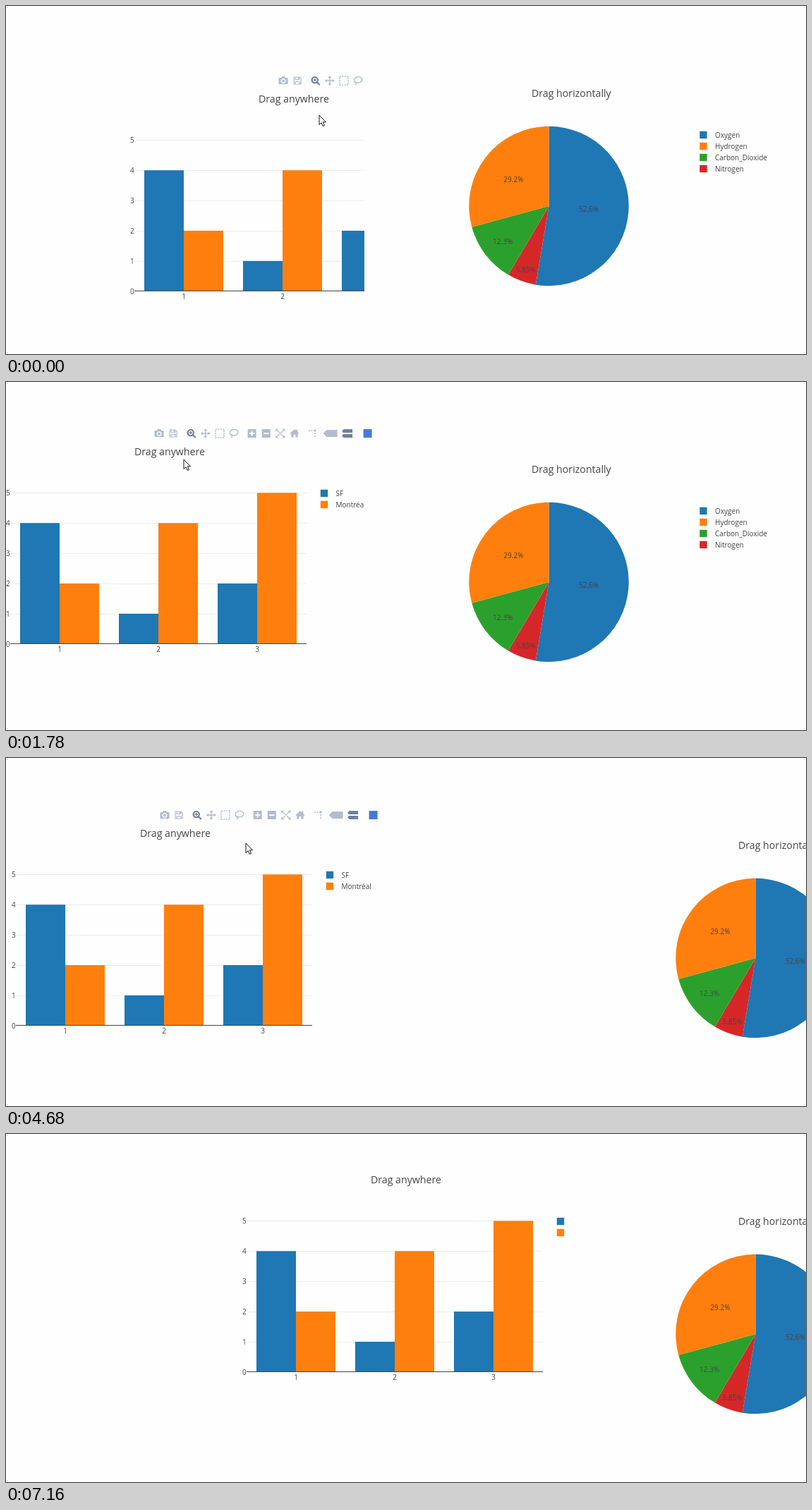
Write an HTML page that moves like this. It is 1134 px wide and 494 px high and loops after 7.26 s.

```html
<!DOCTYPE html>
<html lang="en">
<head>
<meta charset="utf-8">
<title>Draggable charts</title>
<style>
html, body { margin: 0; width: 100%; height: 100%; overflow: hidden; background: #fefefe; }
svg { display: block; width: 1134px; height: 494px; }
text { font: 10px "Open Sans", "Noto Sans", sans-serif; fill: #444; }
.title { font-size: 14.17px; }
.end { text-anchor: end; }
.mid { text-anchor: middle; }
.crisp { shape-rendering: crispEdges; }
</style>
</head>
<body>
<svg viewBox="0 0 1134 494">
  <g id="bars"></g>
  <g id="pie"></g>
  <g id="scroll" class="crisp">
    <rect x="1121" width="13" height="494" fill="#fefefe"/>
    <path d="M1124 6h7l-3.5-4z" fill="#a3a3a3"/>
    <rect x="1122" y="11" width="11" height="448" fill="#c1c1c1"/>
  </g>
  <path id="cursor" d="M0 0V13.5L3.1 10.7 5.3 15.5 7.5 14.5 5.3 9.8H9.5Z" fill="#fff" stroke="#111" stroke-linejoin="round"/>
</svg>
<script>
const LOOP = 7260, STEP = 140;
const BLUE = '#1f77b4', ORANGE = '#ff7f0e', GREEN = '#2ca02c', RED = '#d62728';
const IDLE = '#b3bbce', ACTIVE = '#717f9f', PAPER = '#fefefe';
const byId = id => document.getElementById(id);

const rect = (x, y, w, h, fill, cls = '') =>
  `<rect class="${cls}" x="${x}" y="${y}" width="${w}" height="${h}" fill="${fill}"/>`;
const label = (x, y, s, cls = '') => `<text x="${x}" y="${y}" class="${cls}">${s}</text>`;
const legend = (x, y, items) => items.map(([name, color], i) =>
  rect(x, y + 16 * i - 5.2, 10.4, 10.4, color) + label(x + 21.7, y + 16 * i + 3.8, name)).join('');

// Toolbar glyphs are drawn around their own centre.
const fill = (c, d) => `<path fill="${c}" fill-rule="evenodd" d="${d}"/>`;
const line = (c, d, w = 1.4, dash = 'none') =>
  `<path fill="none" stroke="${c}" stroke-width="${w}" stroke-dasharray="${dash}" d="${d}"/>`;
const BOX = 'M-6-6H6V6H-6Z';
const glyphs = {
  camera: c => fill(c, 'M-6.5-4H-3L-2-6H2L3-4H6.5V5H-6.5ZM0-3a3.5 3.5 0 1 0 .01 0ZM0-1.4a2 2 0 1 1-.01 0Z'),
  disk: c => line(c, 'M-5-5H3L5-3V5H-5ZM-3-5V-1.5H2.5V-5M-3 5V1.5H3V5M1-4.5V-2', 1.2),
  zoom: c => line(c, 'M-1-5.2a4.2 4.2 0 1 0 .01 0ZM2 2 6 6', 2.1) + line(c, 'M-3.2-1H1.2M-1-3.2V1.2'),
  pan: c => line(c, 'M-5 0H5M0-5V5') + fill(c, 'M-7 0-4-2.5V2.5ZM7 0 4-2.5V2.5ZM0-7-2.5-4H2.5ZM0 7-2.5 4H2.5Z'),
  select: c => line(c, BOX, 1.6, '2 1.43'),
  lasso: c => line(c, 'M-5.7-.3A5.8 4 -12 1 1 5.7-2.3A5.8 4 -12 1 1-5.7-.3M-4 1Q-1 3-4 6'),
  plus: c => fill(c, BOX) + line('#fff', 'M-3.5 0H3.5M0-3.5V3.5', 2),
  minus: c => fill(c, BOX) + line('#fff', 'M-3.5 0H3.5', 2),
  expand: c => line(c, 'M-6-3V-6H-3M3-6H6V-3M6 3V6H3M-3 6H-6V3M-5.5-5.5 5.5 5.5M5.5-5.5-5.5 5.5', 1.1),
  home: c => fill(c, 'M-6.5 0 0-6 2.5-3.7V-5.5H4.5V-1.8L6.5 0 5.6 1 4.7.2V5.5H1.4V1.8H-1.4V5.5H-4.7V.2L-5.6 1Z'),
  spikes: c => line(c, 'M-5.5-4H2M3.5-1V6', 1.6, '2 1.4') + fill(c, 'M2-5.5H5V-2.5H2Z'),
  tag: c => fill(c, 'M-10 0-5-5H10V5H-5Z'),
  tags: c => fill(c, 'M-7.5-3-5-6H7.5V-1H-5.5ZM-7.5 3-5.5 1H7.5V6H-5Z'),
  badge: () => rect(-6, -6, 12, 12, '#447adb')
};
const cellWidth = { tag: 30, tags: 18, badge: 29 };

// Groups of buttons are separated by "|".
function toolbar(id, x, y, names) {
  let s = `<g id="${id}">`;
  for (const group of names.split('|')) {
    for (const name of group.split(' ')) {
      const w = cellWidth[name] || 20.1;
      s += `<g transform="translate(${x + w / 2} ${y})">${glyphs[name](/zoom|tags/.test(name) ? ACTIVE : IDLE)}</g>`;
      x += w;
    }
    x += 5.5;
  }
  return s + '</g>';
}

function barChart() {
  const left = 14, base = 379.8, unit = 42.9, width = 56;
  const top = v => base - v * unit;
  let s = '';
  for (let v = 0; v <= 5; v++) {
    if (v) s += rect(left, Math.round(top(v)), 420, 1, '#ececec', 'crisp');
    s += label(13.6, top(v) + 3.8, v, 'end');
  }
  [[4, 2], [1, 4], [2, 5]].forEach((pair, i) => {
    const x = left + width * (0.25 + 2.5 * i);
    pair.forEach((v, j) => { s += rect(x + width * j, top(v), width, v * unit, [BLUE, ORANGE][j]); });
    s += label(x + width, 391, i + 1, 'mid');
  });
  s += rect(left, 379, 420, 1, '#444', 'crisp');
  s += label(190, 112, 'Drag anywhere', 'title');
  s += legend(453.8, 166, [['SF', BLUE], ['Montréal', ORANGE]]);
  return s + toolbar('barTools', 215, 81,
    'camera disk|zoom pan select lasso|plus minus expand home|spikes tag tags|badge');
}

function pieChart() {
  const cx = 769.5, cy = 284, r = 113.2, total = 171;
  const point = (share, radius) => {
    const a = share * 2 * Math.PI;
    return [cx + radius * Math.sin(a), cy - radius * Math.cos(a)];
  };
  let shapes = '', marks = '', from = 0;
  for (const [value, color] of [[90, BLUE], [10, RED], [21, GREEN], [50, ORANGE]]) {
    const share = value / total, to = from + share;
    shapes += `<path fill="${color}" d="M${cx} ${cy}L${point(from, r)}A${r} ${r} 0 ${+(share > 0.5)} 1 ${point(to, r)}Z"/>`;
    // Each label sits at the centre of the largest circle inside its slice.
    const inscribed = Math.min(0.5, 1 / (1 + 1 / Math.sin(share * Math.PI)));
    const [x, y] = point((from + to) / 2, r * (1 - inscribed));
    marks += label(x, y + 3.8, (share * 100).toPrecision(3) + '%', 'mid');
    from = to;
  }
  return rect(508, 88, 583, 375, PAPER, 'crisp') + shapes + marks +
    label(745, 129, 'Drag horizontally', 'title') +
    legend(983.3, 183, [['Oxygen', BLUE], ['Hydrogen', ORANGE], ['Carbon_Dioxide', GREEN], ['Nitrogen', RED]]) +
    toolbar('pieTools', 985, 98, 'camera disk|tag|badge');
}

// Each gesture moves the cursor and, when dragging, a chart title along with it.
const home = { cursor: [444, 155], bar: [358, 132], pie: [0] };
const gestures = [
  { start: 0, end: 400, cursor: [421, 144] },
  { start: 400, end: 1080, cursor: [366, 235], bar: [308, 222] },
  { start: 1080, end: 1230, cursor: [305, 245], bar: [249, 232] },
  { start: 1230, end: 1780, cursor: [252, 110], bar: [182, 99] },
  { start: 1890, end: 2170, cursor: [259, 118], bar: [190, 107] },
  { start: 2180, end: 2600, cursor: [650, 138] },
  { start: 2760, end: 3420, cursor: [941, 140], pie: [293] },
  { start: 3840, end: 4680, cursor: [340, 121] },
  { start: 4940, end: 5350, cursor: [599, 216], bar: [433, 208] },
  { start: 5350, end: 5930, cursor: [700, 197], bar: [540, 187] },
  { start: 6060, end: 6480, cursor: [673, 76], bar: [517, 65] },
  { start: 6480, end: 7160, cursor: [1200, 280] }
];

function poseAt(time) {
  const pose = { ...home };
  for (const g of gestures) {
    if (time < g.start) break;
    // The screen refreshes in whole steps that land on the gesture's end.
    const left = Math.max(0, Math.ceil((g.end - time) / STEP)) * STEP;
    const k = Math.max(0, 1 - left / (g.end - g.start));
    const eased = Math.sin(k * Math.PI / 2);
    for (const part in home)
      if (g[part]) pose[part] = pose[part].map((v, i) => Math.round(v + (g[part][i] - v) * eased));
  }
  return pose;
}

const place = (id, x, y) => byId(id).setAttribute('transform', `translate(${x} ${y})`);
const show = (id, on) => byId(id).setAttribute('visibility', on ? 'visible' : 'hidden');

function render(time) {
  const { cursor: [cx, cy], bar: [x, y], pie: [shift] } = poseAt(time);
  const pieLeft = 508 + shift;
  place('bars', x - 190, y - 107);
  place('pie', shift, 0);
  place('cursor', cx, cy);
  show('barTools', cx < Math.min(pieLeft, x + 341));
  show('pieTools', cx >= pieLeft);
  show('scroll', y > 195);
}

byId('bars').innerHTML = barChart();
byId('pie').innerHTML = pieChart();
const began = performance.now();
function frame() {
  render((performance.now() - began) % LOOP);
  requestAnimationFrame(frame);
}
frame();
</script>
</body>
</html>
```
